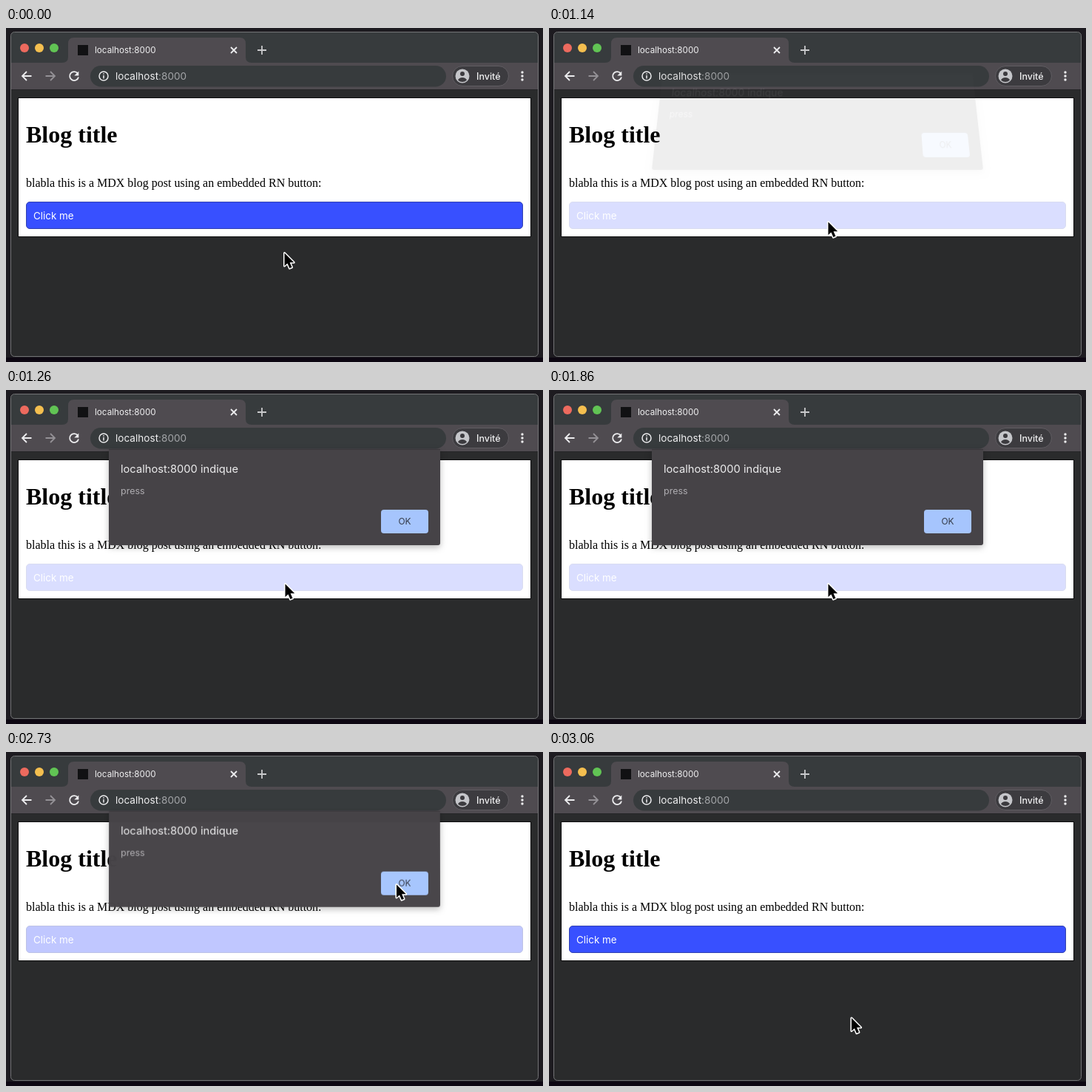
These frames come from a looping animation (726 px wide and 452 px high, 3.09 s). An HTML page:

```html
<!DOCTYPE html>
<html lang="fr">
<head>
<meta charset="utf-8">
<title>localhost:8000</title>
<style>
  html, body { margin: 0; width: 100%; height: 100%; overflow: hidden; background: #1d1b20; }
  svg { position: absolute; left: 0; top: 0; overflow: visible; font-family: Inter, sans-serif; }
  #dialog { left: 139px; top: 80px; transform-origin: 50% 100%; filter: drop-shadow(0 3px 4px #0004); }
  .serif { font-family: "Liberation Serif", serif; }
  .icon { fill: none; stroke: #ececee; stroke-width: 1.8; }
</style>
</head>
<body>
<svg width="726" height="452">
  <!-- window -->
  <rect y="446" width="726" height="6" fill="#0d0712"/>
  <rect x="6.5" y="5.5" width="713" height="439" rx="5" fill="#2a2b2c"/>
  <path d="M7 47V11q0-5 5-5H714q5 0 5 5V47Z" fill="#373b3d"/>
  <path d="M7 47H76q8 0 8-8V21q0-8 8-8H316q8 0 8 8V39q0 8 8 8H719V83H7Z" fill="#4f4b50"/>
  <path d="M7 83.5H719" stroke="#252527"/>
  <rect x="6.5" y="5.5" width="713" height="439" rx="5" fill="none" stroke="#737476"/>

  <!-- tab strip -->
  <circle cx="25" cy="27" r="6" fill="#ed6a5e"/>
  <circle cx="45" cy="27" r="6" fill="#f4bf4f"/>
  <circle cx="65" cy="27" r="6" fill="#61c454"/>
  <rect x="97" y="23" width="14" height="14" fill="#111113"/>
  <text x="120" y="34" font-size="11.7" fill="#f0f0f1">localhost:8000</text>
  <path class="icon" d="M304 26l8 8M312 26l-8 8"/>
  <path class="icon" d="M340 30h12M346 24v12" style="stroke:#c9cacc"/>

  <!-- toolbar -->
  <rect x="114" y="51" width="481" height="28.5" rx="14.2" fill="#373b3d"/>
  <path class="icon" d="M34.5 65H22.5M28 59l-6 6 6 6"/>
  <path class="icon" d="M53.500 65H65.500M60 59l6 6-6 6" style="stroke:#949196"/>
  <path class="icon" d="M97 61.500A6 6 0 1 0 98 66.500"/>
  <path d="M98.300 58.500v6h-6z" fill="#ececee"/>
  <circle class="icon" cx="132" cy="65" r="6" style="stroke-width:1.5"/>
  <path class="icon" d="M132 64v4.500M132 61.200v1.600" style="stroke-width:1.5"/>
  <text x="148" y="70" font-size="13.6" fill="#f0f0f1">localhost<tspan fill="#a3a5a8">:8000</tspan></text>
  <rect x="603.5" y="51.500" width="76" height="27" rx="13.500" fill="#3c3b3f" stroke="#605d62"/>
  <circle cx="617" cy="65" r="9.500" fill="#c5c6ca"/>
  <circle cx="617" cy="62" r="3" fill="#3c3b3f"/>
  <path d="M611 70.500q1.500-3.500 6-3.500t6 3.500q-2.500 2.500-6 2.500t-6-2.500Z" fill="#3c3b3f"/>
  <text x="636" y="70" font-size="12.5" font-weight="500" fill="#f0f0f1">Invité</text>
  <g fill="#ececee">
    <circle cx="698" cy="60" r="1.700"/><circle cx="698" cy="65" r="1.700"/><circle cx="698" cy="70" r="1.700"/>
  </g>

  <!-- page -->
  <rect x="16.500" y="94.500" width="693" height="188" fill="#fff" stroke="#0c0c0d"/>
  <text class="serif" x="27" y="155" font-size="32" font-weight="700">Blog title</text>
  <text class="serif" x="27" y="215" font-size="16">blabla this is a MDX blog post using an embedded RN button:</text>
  <g id="button">
    <rect x="27.500" y="235.500" width="671" height="36" rx="4.500" fill="#3850ff" stroke="#3141b0"/>
    <text x="37" y="259" font-size="13.400" fill="#fff">Click me</text>
  </g>
</svg>

<svg id="dialog" width="448" height="130">
  <path d="M0 0H448V127q0 3-3 3H3q-3 0-3-3Z" fill="#464347"/>
  <path d="M0 .5H448" stroke="#3a373b"/>
  <text x="16" y="32" font-size="14.700" fill="#ededee">localhost:8000 indique</text>
  <text x="16" y="61" font-size="12.500" fill="#aeacb0">press</text>
  <rect x="368" y="82" width="64" height="32" rx="4" fill="#a6c5fd"/>
  <text x="400" y="102" font-size="11.900" text-anchor="middle" fill="#343a48">OK</text>
</svg>

<svg width="726" height="452">
  <g id="cursor" stroke-linejoin="round">
    <path id="arrow" d="M0 0V17.500L4 13.900 6.900 20.600 10 19.300 7.100 12.700H12.700Z"
      stroke="#fff" stroke-width="3" paint-order="stroke"/>
    <g id="hand" stroke="#111" stroke-width="1.200">
      <path fill="#fff" d="M-1.500 2.500C-2 .5 1 0 1.700 2L3.800 8C4 6 6.500 6 7 8 7.500 6.500 9.700 6.800 10 8.800 11 7.600 12.700 8.300 13 10L13.700 14C14 17 12.500 18 12 21.500L4 22C3 19-1 16.500-3.500 13.500-5 11.500-2.500 10.300-1 11.800L1 13.500Z"/>
      <path fill="none" d="M5.500 13.500l.8 5M8 13l.6 5M10.500 12.800l.3 5"/>
    </g>
  </g>
</svg>

<script>
const LOOP = 3090, ALERT_OPEN = 1130, ALERT_CLOSE = 2730;
const $ = id => document.getElementById(id);
const ramp = (t, from, to) => Math.min(1, Math.max(0, (t - from) / (to - from)));
const ease = p => p * p * (3 - 2 * p);

// time, x, y of the pointer tip
const path = [
  [0, 376.5, 304.5], [300, 376.5, 304.5], [630, 378, 264.5], [900, 377.5, 262.5], [2210, 377.5, 262.5],
  [2430, 518.5, 178.5], [2700, 528, 179.5], [2770, 528, 179.5], [3050, 409, 360], [LOOP, 409, 360]
];

function pointerAt(t) {
  const i = path.findIndex(key => key[0] > t);
  const [t0, x0, y0] = path[i - 1], [t1, x1, y1] = path[i];
  const p = ease(ramp(t, t0, t1));
  return [x0 + (x1 - x0) * p, y0 + (y1 - y0) * p];
}

function draw(t) {
  const press = ease(ramp(t, 880, 1030)) - ease(ramp(t, 2685, 2865));
  $('button').style.opacity = 1 - 0.82 * press;

  // the sheet swings in around its lower edge
  const shown = ramp(t, ALERT_OPEN, 1245) - ramp(t, ALERT_CLOSE, 2806);
  const tilt = 0.077 * (1 - shown);
  $('dialog').style.opacity = shown;
  $('dialog').style.transform = `translateY(${-20 * (1 - shown)}px) ` +
    `matrix3d(1,0,0,0, 0,${1 + tilt},0,${-tilt / 130}, 0,0,1,0, 0,0,0,1)`;

  const [x, y] = pointerAt(t);
  const blocked = t > ALERT_OPEN - 20 && t < ALERT_CLOSE;
  const hover = !blocked && y > 235 && y < 272;
  $('cursor').setAttribute('transform', `translate(${x} ${y})`);
  $('hand').style.display = hover ? '' : 'none';
  $('arrow').style.display = hover ? 'none' : '';
}

const start = performance.now();
function tick() {
  draw((performance.now() - start) % LOOP);
  requestAnimationFrame(tick);
}
tick();
</script>
</body>
</html>
```
